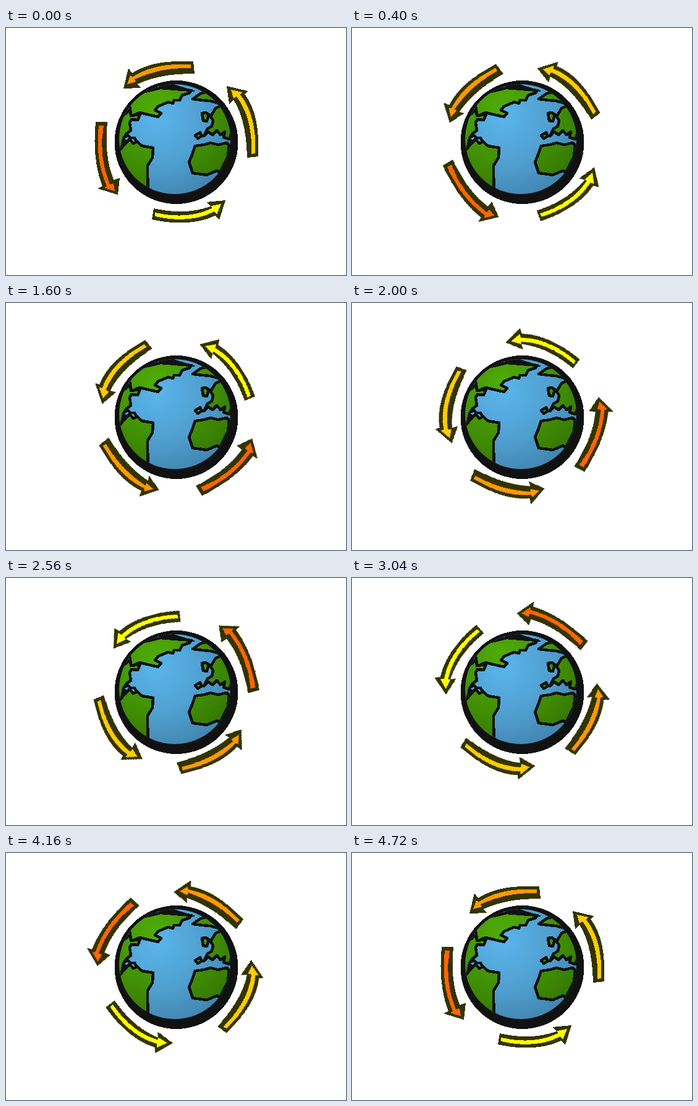
An HTML page that plays this animation: 550 px wide and 400 px high, repeating every 4800 ms.

```html
<!DOCTYPE html>
<html lang="en">
<head>
<meta charset="utf-8">
<title>Globe with circling arrows</title>
<style>
  html, body { margin: 0; width: 100%; height: 100%; overflow: hidden; background: #fff; }
  svg { display: block; width: 550px; height: 400px; }
  .land { fill: url(#green); stroke: #111; stroke-width: 4.5; stroke-linejoin: round; }
  .line { fill: none; stroke: #111; stroke-width: 4.5; stroke-linejoin: round; }
  .edge { fill: #330; }
  /* 60 poses; the last one closes the full turn */
  .ring { transform-origin: 275.5px 184.5px; animation: turn 4.8s steps(60, jump-none) infinite; }
  @keyframes turn { from { transform: rotate(0); } to { transform: rotate(-360deg); } }
</style>
</head>
<body>
<svg viewBox="0 0 550 400" shape-rendering="crispEdges">
  <defs>
    <radialGradient id="sea" gradientUnits="userSpaceOnUse" cx="245" cy="145" r="150">
      <stop offset="0" stop-color="#5ab5ec"/>
      <stop offset=".5" stop-color="#50a0d0"/>
      <stop offset="1" stop-color="#3f7fa8"/>
    </radialGradient>
    <radialGradient id="green" gradientUnits="userSpaceOnUse" cx="245" cy="130" r="150">
      <stop offset="0" stop-color="#50ac08"/>
      <stop offset=".55" stop-color="#429204"/>
      <stop offset="1" stop-color="#347402"/>
    </radialGradient>
    <clipPath id="disc"><ellipse cx="273" cy="180" rx="90" ry="89"/></clipPath>
  </defs>

  <circle cx="275.5" cy="185" r="100" fill="#111"/>
  <g clip-path="url(#disc)">
    <path fill="url(#sea)" d="M180 90H366V272H233L228 250L207 190L190 178Z"/>
    <path fill="#111" d="M240 86L271 91L307 102L298 104L250 99Z"/>
    <!-- North America -->
    <path class="land" d="M250 97L300 101L297 105L285 109L281 117L272 117L270 122L262 120L246 127L241 133L251 138L246 144L216 137L202 143L201 131L196 110Z"/>
    <path class="land" d="M201 132L202 142L217 140L213 149L203 148L200 153L202 166L195 171L190 179L186 200L175 190L180 150Z"/>
    <path class="line" d="M190 177L197 174L202 178L208 178L212 185"/>
    <!-- South America -->
    <path class="land" d="M193 187L200 180L206 187L212 184L220 191L238 194L237 210L229 223L229 236L230 262L200 255L178 205Z"/>
    <!-- Africa -->
    <path class="land" d="M306 191L320 189L331 186L343 189L357 186L361 190L359 208L346 234L341 231L325 238L302 235L296 217L300 208Z"/>
    <!-- Europe -->
    <path class="land" d="M302 115L315 106L340 100L344 122L330 118L318 117Z"/>
    <path class="land" d="M339 130L350 125L372 150L361 180L352 177L354 168L347 173L341 166L334 173L327 168L320 175L326 163L333 159L335 150L331 143Z"/>
    <path class="land" d="M317 138L323 137L328 140L325 151L319 150Z"/>
    <path class="land" d="M306 174L314 169L317 175L310 179Z"/>
  </g>

  <g class="ring">
    <g fill="#f90">
      <path class="edge" d="M190 98L198 65L204 73C226 60 250 52 303 54L305 74C265 74 240 79 212 91L218 97Z"/>
      <path d="M196 91L201 77L205 79C227 66 250 57 299 59L299 65C265 64 240 69 208 83L210 87Z"/>
    </g>
    <g fill="#fc0">
      <path class="edge" d="M357 94L391 102L386 107C404 130 410 165 408 208L390 210C389 180 386 145 368 116L361 123Z"/>
      <path d="M364 100L382 104L379 108C398 132 405 165 403 203L397 204C398 170 393 138 373 111L368 114Z"/>
    </g>
    <g fill="#ff0">
      <path class="edge" d="M355 279L345 311L338 304C310 318 270 318 236 310L239 292C275 300 300 299 331 289L324 282Z"/>
      <path d="M348 285L341 302L337 297C309 313 272 312 241 305L241 299C272 306 304 306 333 292L332 288Z"/>
    </g>
    <g fill="#f60">
      <path class="edge" d="M181 270L148 260L156 256C145 228 141 195 145 152L164 152C161 185 162 215 174 246L184 243Z"/>
      <path d="M176 264L159 259L163 256C150 226 146 195 150 158L158 158C152 190 155 222 168 253L174 252Z"/>
    </g>
  </g>
</svg>
</body>
</html>
```
